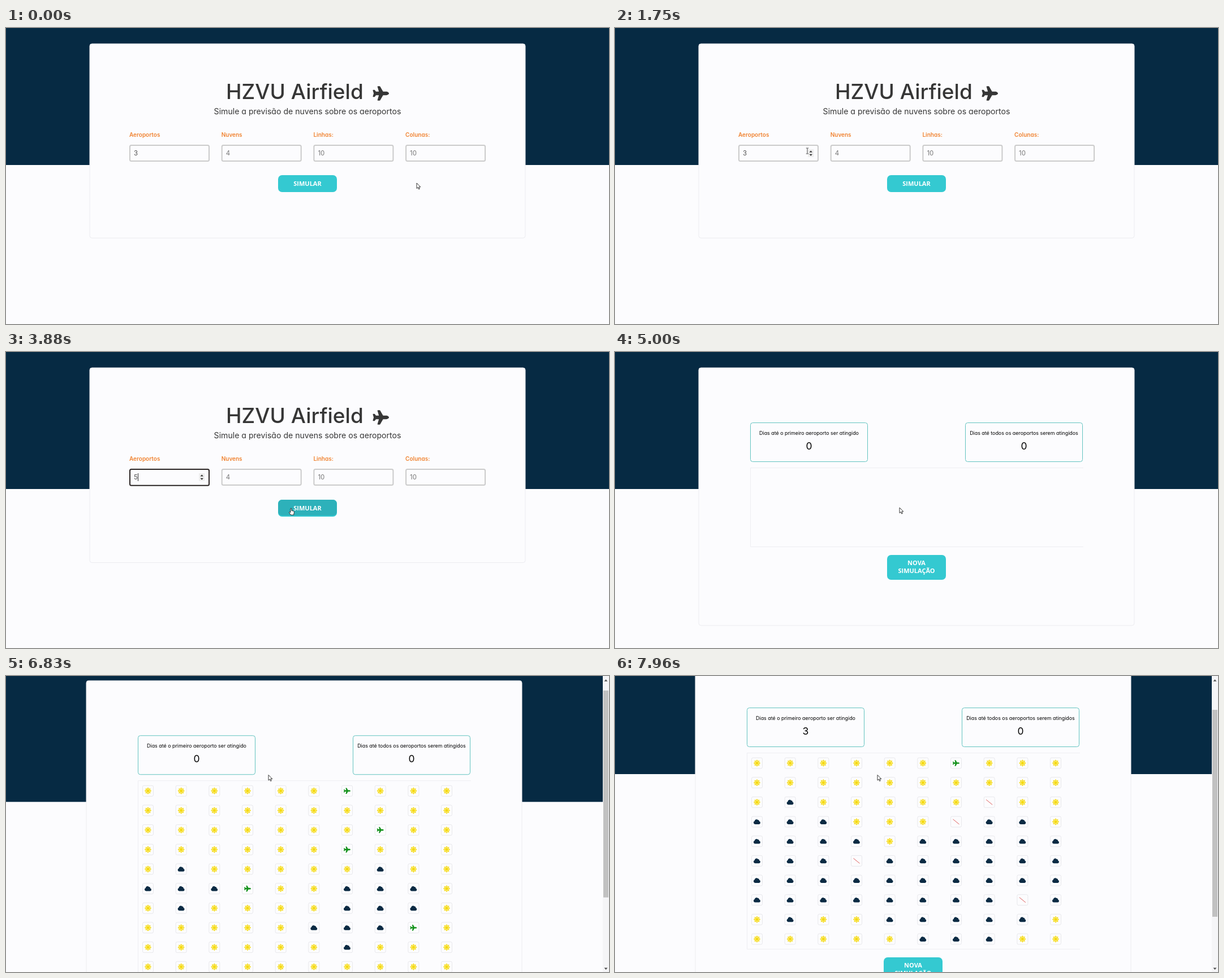
Write an HTML page that moves like this. It is 1066x525 px and loops after 8000 ms.

```html
<!DOCTYPE html>
<html lang="pt">
<head>
<meta charset="utf-8">
<title>Simulador</title>
<style>
html, body { margin: 0; width: 100%; height: 100%; overflow: hidden; background: #fcfcfe; }
svg { display: block; width: 100vw; height: 100vh; }
text { font-family: Inter, "Open Sans", sans-serif; font-feature-settings: "cv11"; font-optical-sizing: none; }
.mid { text-anchor: middle; }
.label { font-size: 10px; font-weight: 600; fill: #f0822f; }
.field { fill: #fcfcfe; stroke: #cbcbcb; stroke-width: 2; }
.value { font-size: 11.5px; fill: #777; }
.btn { font: 700 11px "Open Sans", "Noto Sans", sans-serif; fill: #fff; text-anchor: middle; }
.stat { fill: none; stroke: #62c3c0; }
.faint { fill: none; stroke: #eeeef2; }
</style>
</head>
<body>
<svg id="stage" viewBox="0 0 1066 525" preserveAspectRatio="none">
  <defs>
    <path id="plane" d="M480 192H366L261 8Q256 0 247 0H181Q163 2 166 20L215 192H112L69 134Q64 128 56 128H16Q-2 130 .5 148L32 256 .5 364Q-2 382 16 384H56Q64 384 69 378L112 320H215L166 492Q163 510 181 512H247Q256 512 261 504L366 320H480C515 320 576 291 576 256S515 192 480 192Z"/>
    <path id="cloud" fill="#0a2a43" d="M-3.3 4.4A2.9 2.9 0 0 1-4.2-1.2A3.4 3.4 0 0 1 1.6-3.2A2.2 2.2 0 0 1 4-.7A2.6 2.6 0 0 1 3.6 4.4Z"/>
    <g id="sun"><path id="rays" fill="#f5da12"/><circle r="3.3" fill="none" stroke="#fdf6c8" stroke-width=".8"/></g>
    <use id="airport" href="#plane" fill="#14921c" transform="translate(-6 -5.3) scale(.0208)"/>
    <path id="hit" stroke="#df5c5c" d="M-5.5-4.5L5.5 4.5"/>
    <rect id="cell" class="faint" x="-9.5" y="-9.5" width="19" height="19" rx="2.5" style="stroke:#e8e8ec"/>
  </defs>
  <rect width="1066" height="525" fill="#fcfcfe"/>
  <g id="view">
    <rect width="1080" height="243" fill="#062a43"/>
    <g id="page">
      <rect id="card" x="148" y="28" width="770" fill="#fcfcfe" rx="4" stroke="#ececf0"/>
      <g id="form">
        <text x="389" y="126" font-size="37" font-weight="500" fill="#363636">HZVU Airfield</text>
        <use href="#plane" fill="#363636" transform="translate(648.5 103.3) scale(.0495)"/>
        <text class="mid" x="533" y="153" font-size="14.1" fill="#363636">Simule a previsão de nuvens sobre os aeroportos</text>
        <g id="fields"></g>
        <g id="spin">
          <rect x="341" y="215" width="10.5" height="14" fill="#efefef"/>
          <path d="M343.4 220.4L346.2 217.4 349 220.4ZM343.4 223.8L346.2 226.8 349 223.8Z" fill="#333"/>
        </g>
        <rect id="caret" x="233" y="215" width="1" height="14" fill="#333"/>
        <g id="run">
          <rect x="481" y="261" width="104" height="30" rx="7" fill="#34c9d1"/>
          <rect id="hover" x="481" y="261" width="104" height="28" rx="7" fill="#2db1ba"/>
          <text class="btn" x="533" y="279.5">SIMULAR</text>
        </g>
      </g>
      <g id="result">
        <g id="stats"></g>
        <path id="frame" class="faint"/>
        <g id="grid"></g>
        <g id="again">
          <rect x="481" y="360" width="104" height="44" rx="7" fill="#34c9d1"/>
          <text class="btn" x="533" y="378">NOVA</text>
          <text class="btn" x="533" y="392">SIMULAÇÃO</text>
        </g>
      </g>
    </g>
  </g>
  <g id="bar">
    <rect x="1055" width="11" height="525" fill="#f5f5f7"/>
    <rect id="thumb" x="1056" y="12" width="9" height="367" fill="#c1c1c1"/>
    <path id="up" d="M1057.5 9.5L1060.5 6 1063.5 9.5Z"/>
    <path d="M1057.5 517.5L1060.5 521 1063.5 517.5Z" fill="#505050"/>
  </g>
  <g id="cursor">
    <path id="arrow" d="M0 0V9.6L2.2 7.6 3.8 11 5.3 10.3 3.8 7H6.8Z" fill="#fff" stroke="#222" stroke-width=".9"/>
    <path id="beam" d="M-2.2-5H-.6L0-4.5 .6-5H2.2M0-4.5V4.5M-2.2 5H-.6L0 4.5 .6 5H2.2" fill="none" stroke="#444"/>
    <path id="hand" d="M0 .7Q1-.6 1.9 .7V4.4L5.6 5.3Q6.6 5.7 6.4 7L5.6 12H.5L-2.3 8Q-2.6 6.6-1.4 6.6L0 7.7Z" fill="#fff" stroke="#222" stroke-width=".9"/>
  </g>
</svg>
<script>
const $ = id => document.getElementById(id);
const show = (id, on) => $(id).setAttribute('visibility', on ? 'inherit' : 'hidden');
const move = (id, x, y) => $(id).setAttribute('transform', `translate(${x} ${y})`);
const ease = p => p * p * (3 - 2 * p);
const clamp = p => Math.max(0, Math.min(1, p));

const LOOP = 8000, SUBMIT = 4690, GRID = 5040, FOCUS = 2500;
const SPREAD = [5960, 7040, 7960];
const clouds = [[5, 1], [5, 7], [6, 7], [7, 6]];
const airports = [[0, 6], [2, 7], [3, 6], [5, 3], [7, 8]];

// Cursor legs: start, end, target x, target y
const legs = [
  [170, 290, 721, 277], [880, 1270, 337, 216], [1710, 1750, 340, 218],
  [2250, 2290, 345, 218], [3210, 3420, 503, 277], [SUBMIT, 4710, 503, 276],
  [5920, 6130, 464, 175.5]
];

$('fields').innerHTML = [['Aeroportos', 3], ['Nuvens', 4], ['Linhas:', 10], ['Colunas:', 10]].map(([name, v], i) => {
  const x = 218 + i * 162.7;
  return `<text class="label" x="${x}" y="192.5">${name}</text>
    <rect class="field" id="field${i}" x="${x + 1}" y="208" width="140" height="28" rx="2.5"/>
    <text class="value" id="value${i}" x="${x + 8}" y="226">${v}</text>`;
}).join('');
$('value0').style.fill = '#505050';

$('stats').innerHTML = ['Dias até o primeiro aeroporto ser atingido', 'Dias até todos os aeroportos serem atingidos'].map((s, i) => {
  const x = 239 + i * 380;
  return `<rect class="stat" x="${x + .5}" y="125.5" width="207" height="69" rx="4"/>
    <text class="mid" x="${x + 104}" y="146.5" font-size="8.9">${s}</text>
    <text class="mid" id="days${i}" x="${x + 104}" y="173" font-size="17.5">0</text>`;
}).join('');

$('rays').setAttribute('d', 'M' + Array.from({ length: 16 }, (_, i) => {
  const r = i % 2 ? 4.3 : 6.2, a = i * Math.PI / 8;
  return `${(r * Math.cos(a)).toFixed(2)} ${(r * Math.sin(a)).toFixed(2)}`;
}).join('L') + 'Z');

const cells = [];
for (let r = 0; r < 10; r++) for (let c = 0; c < 10; c++) {
  const id = `icon${r}_${c}`;
  cells.push({
    id,
    at: `translate(${257 + c * 58.67} ${223.5 + r * 34.67})`,
    airport: airports.some(([y, x]) => y === r && x === c),
    dist: Math.min(...clouds.map(([y, x]) => Math.abs(y - r) + Math.abs(x - c)))
  });
}
$('grid').innerHTML = cells.map(c =>
  `<g transform="${c.at}"><use href="#cell"/><use id="${c.id}"/></g>`).join('');

function drawCells(radius) {
  for (const c of cells) {
    const covered = c.dist <= radius;
    const kind = c.airport ? (covered ? 'hit' : 'airport') : (covered ? 'cloud' : 'sun');
    $(c.id).setAttribute('href', '#' + kind);
  }
}

function drawForm(t) {
  const focus = t >= FOCUS;
  $('value0').textContent = t < FOCUS ? 3 : t < 2880 ? 4 : 5;
  $('field0').style.stroke = focus ? '#2a2423' : '';
  $('field0').setAttribute('height', focus ? 28.7 : 28);
  show('spin', t >= 1270);
  show('caret', focus && (t < 3380 || (t >= 3880 && t < 4420)));
  show('hover', t >= 3380);
  move('run', 0, focus ? 1 : 0);
}

let lastRadius = -1;
function drawResult(t, grid) {
  const radius = SPREAD.filter(s => t >= s).length;
  if (radius !== lastRadius) drawCells(lastRadius = radius);
  $('days0').textContent = radius >= 2 ? 3 : 0;
  $('frame').setAttribute('d', `M828 205.5H239.5V${grid ? 553.5 : 345.5}H828`);
  move('again', 0, grid ? 208 : 0);
}

function drawCursor(t) {
  let x = 726, y = 275;
  for (const [a, b, tx, ty] of legs) {
    const p = ease(clamp((t - a) / (b - a)));
    x += (tx - x) * p;
    y += (ty - y) * p;
  }
  move('cursor', x, y);
  const beam = t >= 1270 && t < 2270, hand = t >= 3390 && t < 4710;
  show('beam', beam);
  show('hand', hand);
  show('arrow', !beam && !hand);
}

function draw(t) {
  const result = t >= SUBMIT, grid = t >= GRID;
  const q = 1 - clamp((t - 6800) / 200);
  const scroll = 69 * (1 - q * q);
  show('form', !result);
  show('result', result);
  show('grid', grid);
  show('bar', grid);
  $('card').setAttribute('height', grid ? 665 : result ? 457 : t >= FOCUS ? 345.5 : 344.5);
  move('view', 0, -scroll);
  move('page', grid ? -6 : 0, 0);
  $('thumb').setAttribute('y', 12 + scroll * .696);
  $('up').setAttribute('fill', scroll > 0 ? '#505050' : '#a3a3a3');
  if (result) drawResult(t, grid);
  else drawForm(t);
  if (!result) ['spin', 'caret', 'hover'].forEach(id => $(id).style.display = '');
  else ['spin', 'caret', 'hover'].forEach(id => $(id).style.display = 'none');
  drawCursor(t);
}

const start = performance.now();
function tick() {
  draw((performance.now() - start) % LOOP);
  requestAnimationFrame(tick);
}
tick();
</script>
</body>
</html>
```
